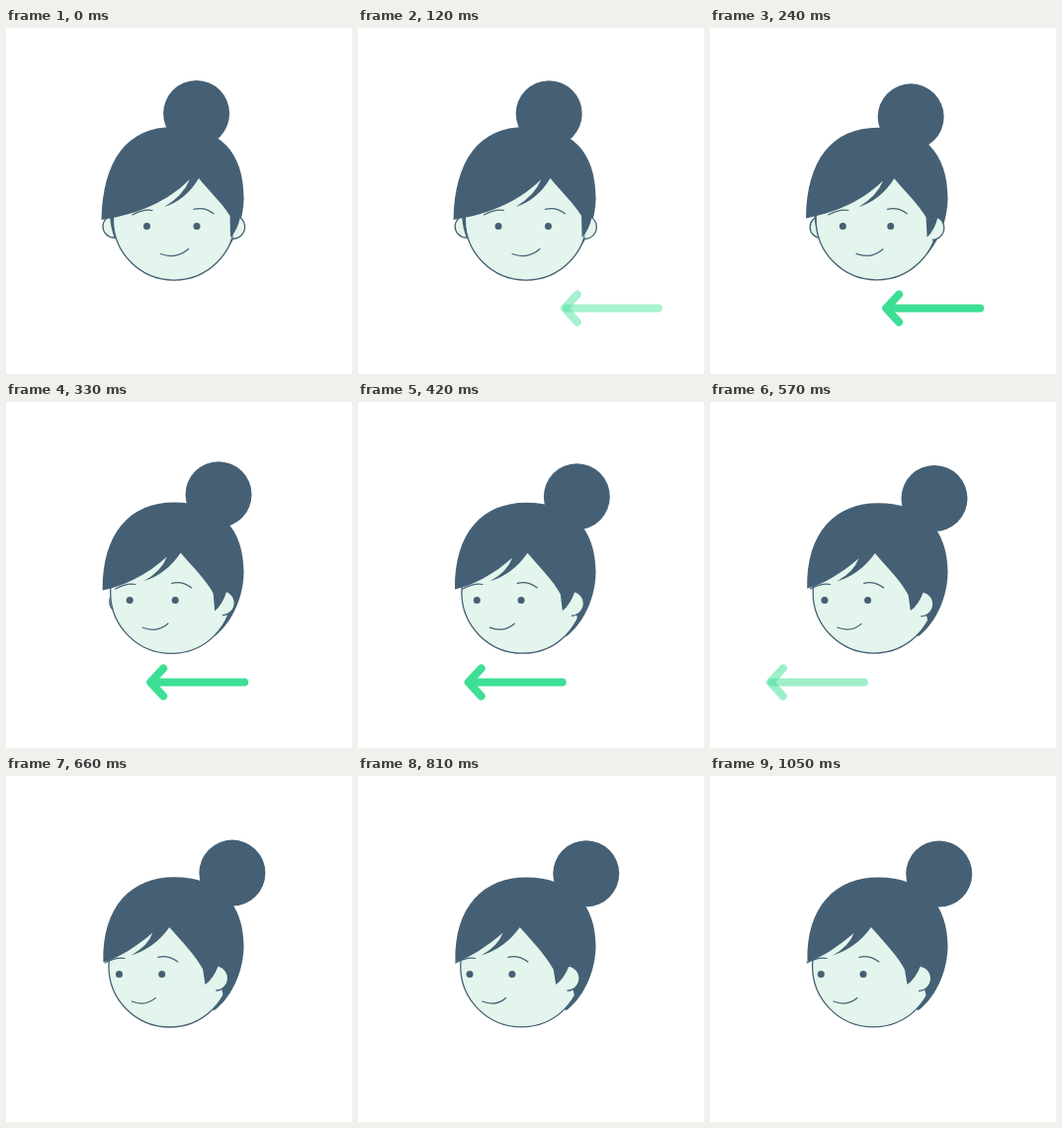
Write an HTML page that moves like this. It is 350 px wide and 350 px high and loops after 1.29 s.

```html
<!DOCTYPE html>
<html lang="en">
<head>
<meta charset="utf-8">
<title>Turn your head</title>
<style>
  html, body { margin: 0; width: 100%; height: 100%; overflow: hidden; background: #fff; }
  svg { display: block; width: 100vw; height: 100vh; }
  .hair { fill: #456075; }
  .skin { fill: #e3f5ec; stroke: #456075; stroke-width: 1.3; }
  .line { fill: none; stroke: #456075; stroke-width: 1.2; stroke-linecap: round; }
  .arrow { fill: none; stroke: #3ddf94; stroke-width: 8; stroke-linecap: round; stroke-linejoin: round; }
</style>
</head>
<body>
<svg viewBox="0 0 350 350">
  <path class="hair" d="M170 110L240.5 172C240.5 195 230 222 211 237L170 220Z"/>
  <circle class="skin" id="farEar" r="11.2"/>
  <path class="hair" id="farLock"/>
  <circle class="skin" id="face" r="61.6"/>
  <path class="hair" id="nape"/>
  <path class="skin" id="nearEar"/>
  <path class="line" id="leftBrow"/>
  <path class="line" id="rightBrow"/>
  <circle class="hair" id="leftEye" r="3.5"/>
  <circle class="hair" id="rightEye" r="3.5"/>
  <path class="line" id="mouth"/>
  <path class="hair" id="fringe"/>
  <circle class="hair" id="bun" r="33.5"/>
  <g id="arrow">
    <path class="arrow" d="M-97 283.5H-4"/>
    <path class="arrow" d="M-86 269.5L-99 283.5L-86 297.5"/>
  </g>
</svg>
<script>
const LOOP = 1290, STEP = 30, TURN_START = 60, TURN_END = 1050;
const byId = id => document.getElementById(id);
const clamp = x => Math.min(1, Math.max(0, x));
const ramp = (t, from, to) => clamp((t - from) / (to - from));
const smooth = u => u * u * (3 - 2 * u);
const lerp = (a, b, p) => a + (b - a) * p;

// Each part: facing forward, then turned aside.
const circles = {
  farEar: [[109.2, 200.8], [121, 203]],
  face: [[170, 193.5], [165.2, 192.3]],
  leftEye: [[142.5, 200.5], [112.3, 200.5]],
  rightEye: [[193, 200.5], [155, 200.5]],
  bun: [[192.6, 86.5], [231.7, 99]]
};
const paths = {
  farLock: [
    "M105 190Q106 204 110.5 214L113 190Z",
    "M107 190Q108 204 112.5 214L115 190Z"],
  nape: [
    "M233 190L240 172L236 190L232 211L231 211L231 201Z",
    "M214 190L240 172L233 203L219 224L217 215L214 204Z"],
  nearEar: [
    "M229.6 189.3A12 12 0 0 1 229.6 213.3",
    "M211 192.1A12.6 12.6 0 0 1 211 217.3"],
  leftBrow: ["M128 189Q139 183 148 184.5", "M98 189Q109 183 118 184.5"],
  rightBrow: ["M190 183.3Q201 180.5 210 187.8", "M151 183.3Q161 180.8 171 188"],
  mouth: ["M156.5 228.5Q172 234.5 184.6 223.5", "M125 228Q139 233.4 148.8 224.5"],
  fringe: [
    "M96.5 194C98 134 122 100 170 100C217 100 240.5 126 240.5 172L237 191Q234 205 227 212" +
    "L226.5 190C220 179 205 164 195 152Q182 174 160 181Q179 170 186 153C158 181 123 190 96.5 194Z",
    "M98.5 188C97 131 128 102.5 170 102.5C216 102.5 240.5 130 240.5 172L213 192Q208 205 199.5 211" +
    "L197 196C190 182 176 168 163 153Q148 174 124 181.5Q141 172 145.5 159C130 172 113 184 98.5 188Z"]
};

function blend([from, to], p) {
  const ends = to.match(/[\d.]+/g);
  let i = 0;
  return from.replace(/[\d.]+/g, n => +lerp(+n, +ends[i++], p).toFixed(2));
}

// Cubic bezier ease (.32, 0, 0, 1), solved by bisection.
function turnEase(u) {
  let low = 0, high = 1;
  for (let i = 0; i < 24; i++) {
    const s = (low + high) / 2;
    const x = 0.96 * s * (1 - s) ** 2 + s ** 3;
    if (x < u) low = s; else high = s;
  }
  return smooth(high);
}

function draw(time) {
  const t = Math.min(TURN_END, Math.floor(time / STEP) * STEP);
  const turn = turnEase(ramp(t, TURN_START, TURN_END));

  for (const [id, [from, to]] of Object.entries(circles)) {
    byId(id).setAttribute("cx", lerp(from[0], to[0], turn));
    byId(id).setAttribute("cy", lerp(from[1], to[1], turn));
  }
  for (const [id, poses] of Object.entries(paths)) {
    byId(id).setAttribute("d", blend(poses, turn));
  }

  const x = lerp(316, 136, smooth(ramp(t, 30, 730)));
  const opacity = t < TURN_START ? 0 : ramp(t, 30, 230) * (1 - ramp(t, 480, 660));
  byId("arrow").setAttribute("transform", `translate(${x} 0)`);
  for (const stroke of byId("arrow").children) stroke.setAttribute("opacity", opacity);
}

const start = performance.now();
function tick() {
  draw((performance.now() - start) % LOOP);
  requestAnimationFrame(tick);
}
tick();
</script>
</body>
</html>
```
